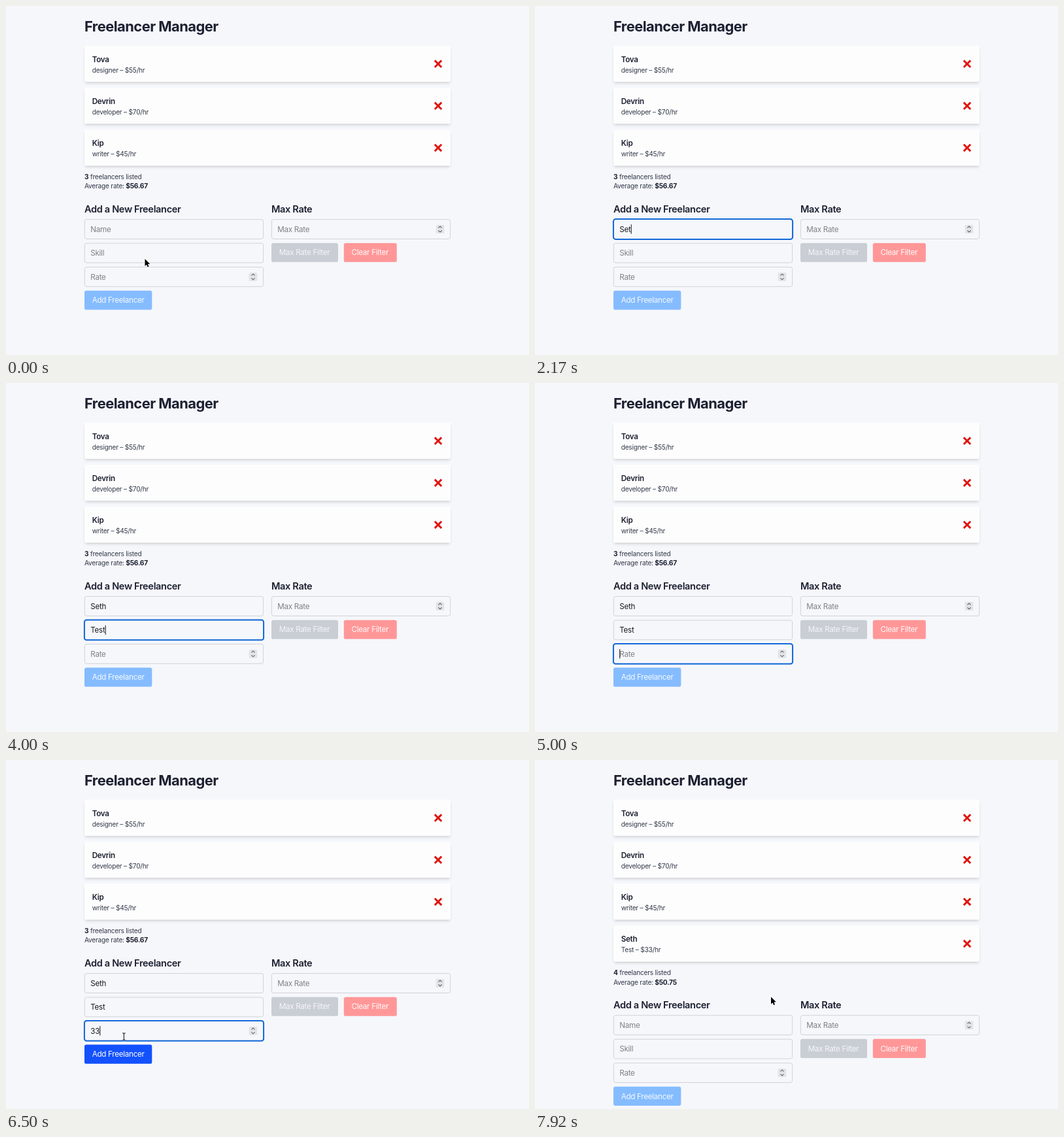
An HTML page with a canvas for the animation above (8000 ms loop, 800x534 px).

```html
<!DOCTYPE html>
<html lang="en">
<head>
<meta charset="utf-8">
<title>Freelancer Manager</title>
<style>
  html, body { margin: 0; width: 100%; height: 100%; overflow: hidden; background: #f5f7fb; }
  canvas { display: block; }
</style>
</head>
<body>
<canvas id="stage" width="800" height="534"></canvas>
<script>
const ctx = document.getElementById('stage').getContext('2d');
const LOOP = 8000, STEP = 1000 / 12;
const REM = 11.67, SMALL = 10.2, RADIUS = 2.9;
const ROW = 64.17, FIELD = 36.46, FIELD_H = 30.6, BUTTON_H = 29.2;
const LEFT = 120, RIGHT = 406, COLUMN = 274;
const INK = '#1c2030', SOFT = '#343a49', HINT = '#7f8187';

const people = [
  { name: 'Tova', skill: 'designer', rate: 55 },
  { name: 'Devrin', skill: 'developer', rate: 70 },
  { name: 'Kip', skill: 'writer', rate: 45 },
];
const added = { name: 'Seth', skill: 'Test', rate: 33 };

// Each field: when it gains and loses focus, and when its keys are struck.
const fields = [
  { hint: 'Name', value: added.name, focus: 660, blur: 3080, keys: [1660, 1830, 2080, 2410] },
  { hint: 'Skill', value: added.skill, focus: 3080, blur: 4580, keys: [3330, 3500, 3660, 3910] },
  { hint: 'Rate', value: String(added.rate), focus: 4580, blur: 7160, keys: [5490, 6080], number: true },
];
const SUBMIT = 7410;

// Pointer legs: [start, end, x0, y0, x1, y1]; it hides while typing.
const legs = [
  [0, 580, 212.5, 387, 221, 339],
  [5740, 6900, 192, 355, 176, 449],
  [7410, 7830, 176, 449, 361, 362.5],
];
const pointerShown = t => t < 1660 || t >= 5740;

function text(str, x, y, size, color = INK, weight = 400) {
  ctx.font = `${weight} ${size}px Inter, sans-serif`;
  ctx.letterSpacing = `${(-0.025 * size).toFixed(3)}px`;
  ctx.fillStyle = color;
  ctx.fillText(str, x, y);
  return x + ctx.measureText(str).width;
}

function box(x, y, w, h, r, fill, stroke, lineWidth = 0.8) {
  ctx.beginPath();
  ctx.roundRect(x, y, w, h, r);
  if (fill) { ctx.fillStyle = fill; ctx.fill(); }
  if (stroke) { ctx.strokeStyle = stroke; ctx.lineWidth = lineWidth; ctx.stroke(); }
}

function line(points, color, width) {
  ctx.beginPath();
  points.forEach(([x, y]) => ctx.lineTo(x, y));
  ctx.strokeStyle = color;
  ctx.lineWidth = width;
  ctx.stroke();
}

function shadow(x, y, w, h, inset, offset, blur) {
  ctx.save();
  ctx.shadowColor = 'rgba(0,0,0,.12)';
  ctx.shadowOffsetY = offset;
  ctx.shadowBlur = blur;
  box(x + inset, y + inset, w - 2 * inset, h - 2 * inset, RADIUS, '#fff');
  ctx.restore();
}

function card(person, y) {
  shadow(LEFT, y, 560, 55.4, 0.73, 2.9, 4.4);
  shadow(LEFT, y, 560, 55.4, 1.46, 1.46, 2.9);
  box(LEFT, y, 560, 55.4, RADIUS, '#fdfdfe');
  text(person.name, 131.7, y + 24.7, REM, INK, 600);
  text(`${person.skill} – $${person.rate}/hr`, 131.7, y + 40.8, SMALL, SOFT);
  const cx = 661, cy = y + 27.8, d = 5.2;
  line([[cx - d, cy - d], [cx + d, cy + d]], '#e01610', 3);
  line([[cx + d, cy - d], [cx - d, cy + d]], '#e01610', 3);
}

function spinner(cx, cy) {
  box(cx - 6.3, cy - 6.5, 12.6, 13, 1.5, '#e3e4e8');
  for (const s of [-1, 1]) {
    line([[cx - 2.6, cy + s * 2], [cx, cy + s * 4.4], [cx + 2.6, cy + s * 2]], '#62656b', 1.1);
  }
}

function input(x, y, hint, value, number, focused, caret) {
  box(x + 0.4, y + 0.4, COLUMN - 0.8, FIELD_H - 0.8, RADIUS, null, '#c6c9cf');
  const end = text(value || hint, x + 9.3, y + 19.5, REM, value ? '#1b1c20' : HINT);
  if (number) spinner(x + COLUMN - 16, y + FIELD_H / 2);
  if (focused) box(x - 0.1, y - 0.1, COLUMN + 0.2, FIELD_H + 0.2, 3.4, null, '#1268d9', 2);
  if (caret) {
    ctx.fillStyle = '#16181d';
    ctx.fillRect(value ? end + 0.2 : x + 9.2, y + 8, 1, 14.5);
  }
}

function button(label, x, y, w, fill, color) {
  box(x, y, w, BUTTON_H, RADIUS, fill);
  text(label, x + 11.67, y + 18.8, REM, color);
}

const cursors = {
  arrow() {
    ctx.beginPath();
    [[0, 0], [0, 11], [2.5, 8.7], [4.2, 12.4], [6, 11.6], [4.4, 8], [7.8, 7.8]]
      .forEach(([x, y]) => ctx.lineTo(x, y));
    ctx.closePath();
    ctx.strokeStyle = '#fff';
    ctx.lineWidth = 1.6;
    ctx.stroke();
    ctx.fillStyle = '#000';
    ctx.fill();
  },
  beam() {
    const stroke = (color, width) => {
      line([[-2.2, -5.5], [0, -4.8], [2.2, -5.5]], color, width);
      line([[0, -5], [0, 5]], color, width);
      line([[-2.2, 5.5], [0, 4.8], [2.2, 5.5]], color, width);
    };
    stroke('#fff', 2.2);
    stroke('#17181b', 1.1);
  },
  hand() {
    ctx.beginPath();
    ctx.moveTo(-2, 5);
    ctx.lineTo(-2, -0.6);
    ctx.quadraticCurveTo(-1, -2, 0, -0.6);
    ctx.lineTo(0.1, 2.4);
    ctx.quadraticCurveTo(3.2, 2, 5, 3.6);
    ctx.quadraticCurveTo(5.8, 6.5, 4, 10);
    ctx.lineTo(-1.3, 10);
    ctx.lineTo(-5, 5.6);
    ctx.quadraticCurveTo(-4.4, 3.8, -2, 6);
    ctx.closePath();
    ctx.fillStyle = '#fff';
    ctx.fill();
    ctx.strokeStyle = '#111';
    ctx.lineWidth = 1;
    ctx.stroke();
    line([[1.4, 3], [1.4, 5]], '#111', 0.8);
    line([[3.2, 3.2], [3.2, 5.2]], '#111', 0.8);
  },
};

function pointerAt(t) {
  const [start, end, x0, y0, x1, y1] = legs.filter(leg => leg[0] <= t).pop();
  const p = Math.min(1, (t - start) / (end - start));
  const ease = p * p * (3 - 2 * p);
  return { x: x0 + (x1 - x0) * ease, y: y0 + (y1 - y0) * ease };
}

const inside = (p, x, y, w, h) => p.x >= x && p.x <= x + w && p.y >= y && p.y <= y + h;

function fieldState(field, t) {
  const struck = field.keys.filter(k => k <= t);
  const focused = t >= field.focus && t < field.blur;
  const since = t - (struck.length ? struck[struck.length - 1] : field.focus);
  return {
    value: t < SUBMIT ? field.value.slice(0, struck.length) : '',
    focused,
    caret: focused && since % 1000 < 500,
  };
}

function draw(t) {
  ctx.fillStyle = '#f5f7fb';
  ctx.fillRect(0, 0, 800, 534);
  text('Freelancer Manager', LEFT, 38.7, 21.9, INK, 700);

  const list = t < SUBMIT ? people : [...people, added];
  list.forEach((person, i) => card(person, 60.8 + i * ROW));

  const shift = (list.length - people.length) * ROW;
  const average = list.reduce((sum, p) => sum + p.rate, 0) / list.length;
  let x = text(`${list.length}`, LEFT, 264.9 + shift, SMALL, INK, 700);
  text(' freelancers listed', x, 264.9 + shift, SMALL, SOFT);
  x = text('Average rate: ', LEFT, 279.4 + shift, SMALL, SOFT);
  text(`$${average.toFixed(2)}`, x, 279.4 + shift, SMALL, INK, 700);

  const headingY = 316 + shift, top = 326.2 + shift;
  const addY = top + 3 * FIELD, filterY = top + FIELD;
  text('Add a New Freelancer', LEFT, headingY, 14.6, INK, 600);
  text('Max Rate', RIGHT, headingY, 14.6, INK, 600);

  const pointer = pointerAt(t);
  const states = fields.map(field => fieldState(field, t));
  fields.forEach((field, i) => {
    const s = states[i];
    input(LEFT, top + i * FIELD, field.hint, s.value, field.number, s.focused, s.caret);
  });
  input(RIGHT, top, 'Max Rate', '', true);

  const enabled = states.every(s => s.value);
  const hover = enabled && pointerShown(t) && inside(pointer, LEFT, addY, 103.3, BUTTON_H);
  const addFill = hover ? '#123fdf' : enabled ? '#1351fd' : '#85bcff';
  button('Add Freelancer', LEFT, addY, 103.3, addFill, enabled ? '#fff' : '#f6faff');
  button('Max Rate Filter', RIGHT, filterY, 102, '#c9cdd4', '#f5f6f8');
  button('Clear Filter', 516.8, filterY, 81, '#ff9798', '#fffafa');

  if (!pointerShown(t)) return;
  const overField = t >= STEP - 1 &&
    fields.some((_, i) => inside(pointer, LEFT, top + i * FIELD, COLUMN, FIELD_H));
  ctx.save();
  ctx.translate(pointer.x, pointer.y);
  cursors[hover ? 'hand' : overField ? 'beam' : 'arrow']();
  ctx.restore();
}

const began = performance.now();
function tick() {
  const t = (performance.now() - began) % LOOP;
  draw(Math.floor(t / STEP) * STEP);
  requestAnimationFrame(tick);
}
tick();
</script>
</body>
</html>
```
